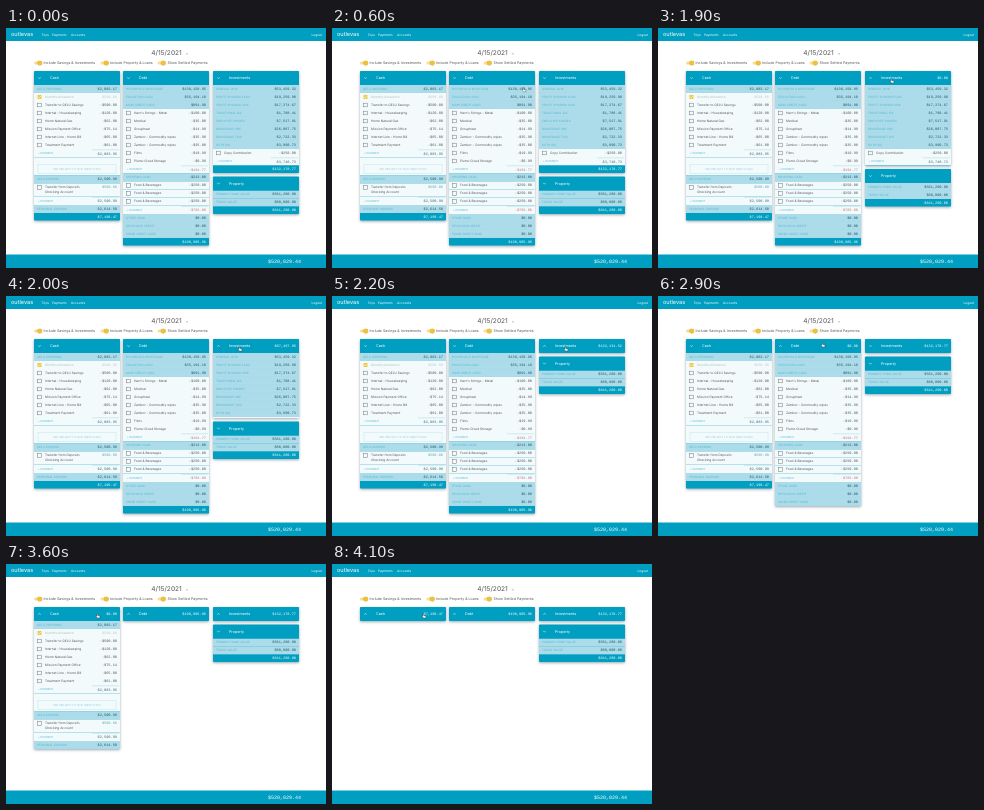
These frames come from a looping animation (320x240 px, 4.2 s). An HTML page with a canvas:

```html
<!DOCTYPE html>
<html lang="en">
<head>
<meta charset="utf-8">
<title>Budget overview</title>
<style>
  html, body { margin: 0; width: 100%; height: 100%; overflow: hidden; background: #fff; }
  canvas { display: block; width: 320px; height: 240px; }
</style>
</head>
<body>
<canvas></canvas>
<script>
const LOOP = 4200;
const BLUE = '#009fc1', PALE = '#acdcea', SANS = 'Inter, sans-serif', MONO = '"Liberation Mono", monospace';
const HEADER = 14, FOOTER = 7.5, WIDTH = 86, TOP = 43;
const HEIGHTS = { section: 8, item: 8, done: 8, tall: 13, sum: 8.5, button: 18 };

const canvas = document.querySelector('canvas');
const c = canvas.getContext('2d');
const dpr = window.devicePixelRatio || 1;
canvas.width = 320 * dpr;
canvas.height = 240 * dpr;

const section = (label, value) => ({ kind: 'section', label, value });
const item = (label, value) => ({ kind: 'item', label, value });
const sum = (value, color) => ({ kind: 'sum', label: '+ PAYMENT', value, color });

const cash = { title: 'Cash', x: 28, total: 7198.47, click: 3575, rows: [
  section('QELU CHECKING', '$2,083.17'),
  { kind: 'done', label: 'Monthly Allowance', value: '$500.00' },
  item('Transfer to QELU Savings', '-$500.00'),
  item('Internal - Housekeeping', '-$120.00'),
  item('Home Natural Gas', '-$62.00'),
  item('Mission Payment Office', '-$75.14'),
  item('Internet Line - Home Bill', '-$65.00'),
  item('Treatment Payment', '-$61.00'),
  sum('$2,083.95'),
  { kind: 'button', label: 'SEE PROJECT TO 12/31 (NEXT DUES)' },
  section('QELU SAVINGS', '$2,500.99'),
  { kind: 'tall', label: 'Transfer from Deposits', more: 'Checking Account', value: '$500.00' },
  sum('$2,500.99'),
  section('PERSONAL SAVINGS', '$2,614.50') ] };

const debt = { title: 'Debt', x: 117, total: 198905.96, click: 2875, rows: [
  section('HOUSEHOLD MORTGAGE', '$138,158.95'),
  section('EDUCATION LOAN', '$35,194.18'),
  section('MAIN CREDIT CARD', '$891.90'),
  item("Harn's Strings - Metal", '-$100.00'),
  item('Medical', '-$35.00'),
  item('Groupheat', '-$14.99'),
  item('Zambor - Commodity wipes', '-$35.98'),
  item('Zambor - Commodity wipes', '-$35.00'),
  item('Films', '-$19.99'),
  item('Plumo Cloud Storage', '-$0.99'),
  sum('-$194.77', '#c56f7c'),
  section('SHOPPING CARD', '-$213.00'),
  item('Food & Beverages', '-$250.00'),
  item('Food & Beverages', '-$250.00'),
  item('Food & Beverages', '-$250.00'),
  sum('-$703.00', '#c56f7c'),
  section('STORE CARD', '$0.00'),
  section('REVOLVING CREDIT', '$0.00'),
  section('SPARE CREDIT CARD', '$0.00') ] };

const investments = { title: 'Investments', x: 207, total: 132178.77, click: 1875, rows: [
  section('GENERAL 401K', '$53,459.32'),
  section('PROFIT SHARING PLAN', '$19,259.98'),
  section('PROFIT SHARING 401K', '$17,374.67'),
  section('TRADITIONAL IRA', '$1,788.41'),
  section('EMPLOYEE SHARES', '$7,517.91'),
  section('BROKERAGE ONE', '$26,087.75'),
  section('BROKERAGE TWO', '$2,722.33'),
  section('ROTH IRA', '$3,990.73'),
  item('Copy Contribution', '-$250.00'),
  sum('$3,740.73') ] };

const property = { title: 'Property', x: 207, total: 641200, click: Infinity, rows: [
  section('PRIMARY HOME VALUE', '$561,200.00'),
  section('TRUCK VALUE', '$80,000.00') ] };

const columns = [[cash], [debt], [investments, property]];

const cursorPath = [[200, 191, 120], [700, 191, 53], [800, 193, 53], [1000, 230, 50], [1300, 230, 50],
  [1700, 233, 51], [2450, 233, 51], [2800, 164, 47], [3100, 164, 47], [3500, 91, 50], [LOOP, 91, 50]];

const clamp = v => Math.max(0, Math.min(1, v));
const smooth = v => { v = clamp(v); return v * v * (3 - 2 * v); };
const money = v => '$' + v.toLocaleString('en-US', { minimumFractionDigits: 2, maximumFractionDigits: 2 });

function rect(x, y, w, h, color) {
  c.fillStyle = color;
  c.fillRect(x, y, w, h);
}

function text(str, x, y, size, color, align = 'left', font = SANS) {
  c.font = `${size}px ${font}`;
  c.fillStyle = color;
  c.textAlign = align;
  c.fillText(str, x, y);
}

const amount = (str, x, y, color, size = 3.6) => text(str, x, y, size, color, 'right', MONO);

function line(points, color, width) {
  c.beginPath();
  points.forEach(p => c.lineTo(...p));
  c.strokeStyle = color;
  c.lineWidth = width;
  c.stroke();
}

function round(x, y, w, h, r, color) {
  c.beginPath();
  c.roundRect(x, y, w, h, r);
  c.fillStyle = color;
  c.fill();
}

function checkbox(x, y, checked) {
  if (checked) {
    round(x, y, 4, 4, .5, '#f2c744');
    line([[x + .8, y + 2], [x + 1.7, y + 3], [x + 3.3, y + 1]], '#fff', .5);
  } else {
    c.strokeStyle = '#777';
    c.lineWidth = .5;
    c.strokeRect(x + .2, y + .2, 3.6, 3.6);
  }
}

function drawRow({ kind, label, more, value, color }, x, y) {
  const h = HEIGHTS[kind], right = x + WIDTH - 3;
  const mid = y + (kind === 'tall' ? 4 : h / 2);
  rect(x, y, WIDTH, h, kind === 'section' ? PALE : '#f3fafc');
  if (kind === 'section') {
    line([[x, y + h - .1], [x + WIDTH, y + h - .1]], '#9bd3e3', .3);
    text(label, x + 3, mid, 3, '#57b7d0');
    amount(value, right, mid, '#24515f');
  } else if (kind === 'sum') {
    line([[x + 58, y + .8], [right + 2, y + .8]], '#8dcfdf', .4);
    text(label, x + 4, mid + .4, 2.7, '#55b9d2');
    amount(value, right, mid + .4, color || '#45636d');
  } else if (kind === 'button') {
    c.strokeStyle = '#b5dfea';
    c.lineWidth = .4;
    c.strokeRect(x + 4, y + 7, WIDTH - 8, 9);
    text(label, x + WIDTH / 2, y + 11.6, 2.7, '#8fcfdf', 'center');
  } else {
    const done = kind === 'done';
    checkbox(x + 3.5, mid - 2, done);
    text(label, x + 11, mid, 3.2, done ? '#bcccc6' : '#555');
    if (more) text(more, x + 11, mid + 5, 3.2, '#555');
    if (done) line([[x + 11, mid], [x + 40, mid]], '#c3d2cd', .3);
    amount(value, right, mid, done ? '#bccdd2' : more ? '#63a6b6' : '#555');
  }
}

// Draws one card and returns its bottom edge.
function drawCard(card, y, t) {
  const { x, rows, total, click, title } = card;
  const closing = t >= click, age = t - click - 50;
  const full = rows.reduce((h, row) => h + HEIGHTS[row.kind], 0);
  const body = full * (1 - smooth(age / 270));
  const bottom = y + HEADER + body + (closing ? 0 : FOOTER);

  c.save();
  c.shadowColor = 'rgba(0,40,60,.4)';
  c.shadowBlur = 3 * dpr;
  c.shadowOffsetY = dpr;
  round(x, y, WIDTH, bottom - y, .8, BLUE);
  c.restore();

  c.save();
  c.beginPath();
  c.rect(x, y + HEADER, WIDTH, body);
  c.clip();
  let rowY = y + HEADER;
  for (const row of rows) {
    drawRow(row, x, rowY);
    rowY += HEIGHTS[row.kind];
  }
  c.restore();

  const mid = y + 7;
  const tip = closing ? -.7 : .7;
  line([[x + 4.2, mid - tip], [x + 5.5, mid + tip], [x + 6.8, mid - tip]], '#fff', .5);
  text(title, x + 16, mid, 3.7, '#fff');
  if (closing) amount(money(total * (1 - (1 - clamp(age / 320)) ** 4)), x + WIDTH - 3, mid, '#fff');
  else amount(money(total), x + WIDTH - 3, bottom - 3.7, '#fff');
  return bottom;
}

function drawToggle(x, label, labelX) {
  round(x, 33.6, 8, 3, 1.5, '#f6df91');
  c.save();
  c.shadowColor = 'rgba(0,0,0,.35)';
  c.shadowBlur = dpr;
  round(x + 3.4, 32.7, 4.8, 4.8, 2.4, '#f2c230');
  c.restore();
  text(label, labelX, 35.2, 3.6, '#555');
}

function drawCursor(t) {
  if (t < cursorPath[0][0]) return;
  const i = cursorPath.findIndex(p => p[0] > t);
  const [t0, x0, y0] = cursorPath[i - 1], [t1, x1, y1] = cursorPath[i];
  const k = smooth((t - t0) / (t1 - t0));
  c.save();
  c.translate(x0 + (x1 - x0) * k, y0 + (y1 - y0) * k);
  c.beginPath();
  [[0, 0], [.8, 0], [.9, 1.6], [3, 2.1], [2.8, 4], [.6, 4], [-1, 2.2], [-.6, 1.8], [0, 2.2]].forEach(p => c.lineTo(...p));
  c.closePath();
  c.fillStyle = '#fff';
  c.strokeStyle = '#333';
  c.lineWidth = .4;
  c.fill();
  c.stroke();
  c.restore();
}

function draw(t) {
  c.setTransform(dpr, 0, 0, dpr, 0, 0);
  c.textBaseline = 'middle';
  c.textRendering = 'geometricPrecision';
  rect(0, 0, 320, 240, '#fff');

  rect(0, 0, 320, 13, BLUE);
  text('outlevas', 5, 6.5, 5.6, '#fff');
  text('Trips', 35.5, 6.7, 3.2, '#fff');
  text('Payments', 46, 6.7, 3.2, '#fff');
  text('Accounts', 65, 6.7, 3.2, '#fff');
  text('Logout', 316, 6.7, 3.2, '#fff', 'right');

  text('4/15/2021', 160.5, 25.3, 6.6, '#555', 'center');
  line([[180, 25.4], [181, 26.3], [182, 25.4]], '#777', .5);
  drawToggle(28, 'Include Savings & Investments', 37.5);
  drawToggle(94.5, 'Include Property & Loans', 104);
  drawToggle(151.5, 'Show Settled Payments', 161.5);

  for (const cards of columns) {
    let y = TOP;
    for (const card of cards) y = drawCard(card, y, t) + 3.5;
  }

  rect(0, 226.5, 320, 13.5, BLUE);
  amount('$520,029.44', 295, 233.6, '#fff', 5);
  drawCursor(t);
}

const start = performance.now();
function tick() {
  draw((performance.now() - start) % LOOP);
  requestAnimationFrame(tick);
}
tick();
</script>
</body>
</html>
```
